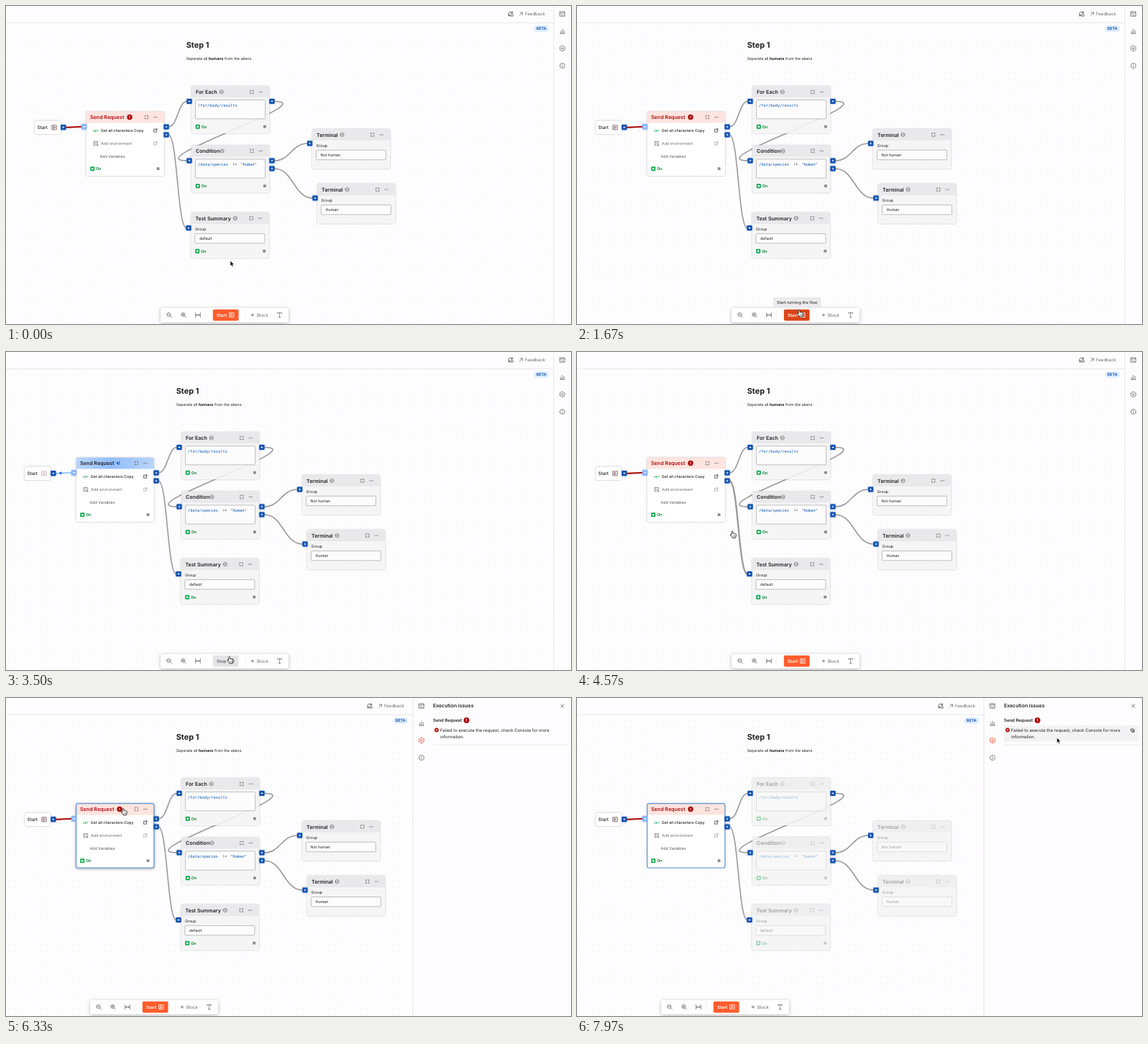
An HTML page that plays this animation: 786x442 px, repeating every 8 s.

```html
<!DOCTYPE html>
<html lang="en">
<head>
<meta charset="utf-8">
<title>Flow editor</title>
<style>
html, body { margin: 0; width: 100%; height: 100%; overflow: hidden; background: #fdfcfe; }
svg { display: block; width: 100vw; height: 100vh; }
text { font-family: Inter, sans-serif; text-rendering: geometricPrecision; white-space: pre; }
.mono { font-family: "DejaVu Sans Mono", monospace; }
.card { filter: drop-shadow(0 .8px 1.3px rgba(0,0,0,.3)); }
.port { filter: drop-shadow(0 0 1.2px rgba(20,80,180,.5)); }
.bar { filter: drop-shadow(0 1px 2.5px rgba(0,0,0,.28)); }
.ico { fill: none; stroke: #6b6b6b; stroke-width: .8; stroke-linecap: round; stroke-linejoin: round; }
</style>
</head>
<body>
<svg id="stage" viewBox="0 0 786 442" xmlns="http://www.w3.org/2000/svg"></svg>
<script>
const LOOP = 8000;
const INK = '#212121', GREY = '#6b6b6b', RED = '#ab0a0a', BLUE = '#0b4fae', GREEN = '#0cab4c', ORANGE = '#ff5c2d';

// ---- drawing helpers ----
const text = (x, y, s, size = 5.35, fill = INK, weight = 400, extra = '') =>
  `<text x="${x}" y="${y}" font-size="${size}" fill="${fill}" font-weight="${weight}" ${extra}>${s}</text>`;
const rect = (x, y, w, h, fill, r = 0, extra = '') =>
  `<rect x="${x}" y="${y}" width="${w}" height="${h}" rx="${r}" fill="${fill}" ${extra}/>`;
const icon = (x, y, d, extra = '') =>
  `<path class="ico" transform="translate(${x} ${y})" d="${d}" ${extra}/>`;
const group = (id, body, extra = '') => `<g id="${id}" ${extra}>${body}</g>`;
const ring = r => `M${-r} 0a${r} ${r} 0 1 0 ${2 * r} 0a${r} ${r} 0 1 0 ${-2 * r} 0`;
const badge = (x, y, r) =>
  `<circle cx="${x}" cy="${y}" r="${r}" fill="${RED}"/>` +
  text(x, y + r * .55, '!', r * 1.55, '#fff', 700, 'text-anchor="middle"');

const PLAY = 'M-3 -3h6v6h-6zM-1 -1.5L1.5 0L-1 1.5z';
const EXPAND = 'M-2.2 -.8v-1.4h1.4M.8 -2.2h1.4v1.4M2.2 .8v1.4h-1.4M-.8 2.2h-1.4v-1.4';
const OPEN = 'M0 -2h-2v4h4v-2M.3 -.3L2.3 -2.3M.8 -2.4h1.6v1.6';
const INFO = ring(3.5) + 'M0 -.4v2M0 -1.8v.1';

// ---- canvas nodes ----
const header = (x, y, w, fill) =>
  `<path d="M${x} ${y + 15.7}v-13.2q0 -2.5 2.5 -2.5h${w - 5}q2.5 0 2.5 2.5v13.2z" fill="${fill}"/>`;

const tools = (right, cy) => icon(right - 24.5, cy, EXPAND) +
  [-2, 0, 2].map(d => `<circle cx="${right - 12 + d}" cy="${cy}" r=".65" fill="${GREY}"/>`).join('');

const status = (x, y, right) =>
  rect(x, y - 3, 6, 6, GREEN, 1) + rect(x + 1.7, y - 1.3, 2.6, 2.6, '#fff', .6) +
  text(x + 8, y + 2, 'On', 5.4, '#007f31', 600) +
  rect(right - 10, y - 1.9, 3.8, 3.8, '#8a8a8a', .5);

const field = (x, y, h) => rect(x, y, 97, h, '#fff', 1, 'fill-opacity=".75" stroke="#a6a6a6" stroke-width=".7"');
const groupField = (x, y, value) =>
  text(x + 5.6, y + 25, 'Group') + field(x + 5.5, y + 29.2, 13.4) + text(x + 11.5, y + 37.8, value);

function node(x, y, h, title, iconX, body) {
  const w = 108.3, cy = y + 7.8;
  return rect(x, y, w, h, '#fff', 2.5, 'class="card" fill-opacity=".84"') +
    `<g class="dim">` + header(x, y, w, '#e9e8eb') + text(x + 6, cy + 2.6, title, 7.1, INK, 600) +
    icon(iconX, cy, ring(2.6) + 'M-1.2 0h2.4', 'stroke-width=".6"') + tools(x + w, cy) + body + '</g>';
}

const code = (x, y, s, fill = '#0a56b0') => text(x, y, s, 5.38, fill, 400, 'class="mono"');

const nodes =
  node(244.1, 111.6, 65.5, 'For Each', 285.8, field(249.6, 130.6, 26.2) +
    code(253, 140, '/for/body/results') + status(249.8, 167.7, 354)) +
  node(244.1, 193.7, 65.8, 'Condition', 286.5, field(249.6, 212.9, 26.2) +
    code(253, 222, '/data/species') + code(300.7, 222, '!=', '#444') + code(312.3, 222, '"Human"') +
    status(249.8, 250.2, 354)) +
  node(243.4, 287.2, 62.8, 'Test Summary', 304.9, groupField(243.4, 287.2, 'default') + status(249.2, 340.7, 353.3)) +
  node(412, 171.1, 55.2, 'Terminal', 453.5, groupField(412, 171.1, 'Not human')) +
  node(419, 247.3, 55.2, 'Terminal', 460.6, groupField(419, 247.3, 'Human'));

const request =
  rect(97.6, 146.7, 108.3, 89.3, '#fff', 2.5, 'id="reqCard" class="card"') +
  group('headError', header(97.6, 146.7, 108.3, '#ffe4df') +
    text(103, 157.2, 'Send Request', 7.1, RED, 600) + badge(158, 154.5, 3.7)) +
  group('headBusy', header(97.6, 146.7, 108.3, 'url(#busy)') +
    text(103, 157.2, 'Send Request', 7.1, INK, 600) +
    `<path d="M153.3 154.5l3 -2.6v5.2zM157 151.9h.9v5.2h-.9z" fill="#1763d6"/>`) +
  tools(205.9, 154.5) +
  text(107, 174.5, 'GET', 3.9, GREEN, 600) + text(117.8, 175, 'Get all characters Copy', 5.35, INK, 500) +
  icon(193.6, 173.2, OPEN, 'style="stroke:#444"') +
  icon(111, 191.2, 'M-2.6 -2.6h5.2v2M-2.6 -2.6v5.2h2M-1 0h2M2 .8v2.4M.8 2h2.4') +
  text(118, 193.2, 'Add environment', 5.35, GREY) + icon(193.6, 191.2, OPEN, 'style="stroke:#aaa"') +
  text(116.5, 210.6, 'Add Variables', 5.35, '#555') + status(103.2, 226.2, 205.7) +
  rect(97.6, 146.7, 108.3, 89.3, 'none', 2.5, 'id="reqRing" stroke="#5e97d8" stroke-width="1.2"');

const startNode = rect(26, 159.6, 36, 18.4, '#fff', 2.5, 'class="card"') +
  text(29.4, 171.2, 'Start', 6.3, INK, 500) +
  icon(53.2, 168.8, PLAY, 'id="startIcon"');

// ---- edges and ports ----
const curve = (x1, y1, x2, y2, d = (x2 - x1) / 2) =>
  `M${x1} ${y1}C${x1 + d} ${y1} ${x2 - d} ${y2} ${x2} ${y2}`;
const edge = (d, extra = '') => `<path d="${d}" fill="none" stroke="#9b999c" stroke-width="1.6" ${extra}/>`;
const edges = edge(curve(212, 168, 238, 132.5)) +
  edge(curve(212, 179, 237, 308.5), 'id="longEdge"') +
  edge(curve(359, 132.5, 238, 215, 70)) +
  edge(curve(359, 215, 406, 191)) + edge(curve(359, 226, 413, 267)) +
  edge(curve(69, 168.7, 92, 167.7), 'id="firstEdge"') +
  '<circle id="pulse" r="1.7" fill="#2a6fdc"/>';

const port = ([x, y]) => rect(x - 3.6, y - 3.6, 7.2, 7.2, BLUE, .8, 'class="port"') +
  `<path d="M${x - 1.5} ${y}h3M${x} ${y - 1.5}v3" stroke="#fff" stroke-width=".8"/>`;
const ports = [[65.8, 168.7], [209, 168], [209, 179], [241, 132.5], [356, 132.5], [241, 215],
  [356, 215], [356, 226], [240, 308.5], [408.6, 191], [416, 267]].map(port).join('') +
  rect(90.9, 164.2, 7.2, 7.2, '#86b6f8', .8, 'class="port"') +
  '<path d="M92.6 167.8h3.4M94.7 166.4l1.4 1.4l-1.4 1.4" fill="none" stroke="#fff" stroke-width=".8"/>';

const heading = text(236.7, 58.4, 'Step 1', 10.9, INK, 700) +
  text(236.7, 75, 'Seperate all <tspan font-weight="700">humans</tspan> from the aliens.', 5.3);

// ---- fixed interface ----
const feedback = icon(702, 11, 'M-3 .8a3 3 0 0 1 5.4 -2.4M2.6 -3.2v1.8h-1.8M-2.8 1.4a3 3 0 0 0 2.4 1.6M-3 3v-1.6h1.6', 'style="stroke:#444"') +
  `<circle cx="703.8" cy="12.8" r="1.6" fill="none" stroke="#444" stroke-width=".8"/>` +
  icon(716.6, 11, 'M-2 2L1.8 -1.8M-1.2 -2h3.2v3.2') +
  text(722, 13.1, 'Feedback', 6.05, GREY);
const beta = rect(734.5, 27, 20.5, 8.8, '#dcebfd', 4.4) +
  text(744.8, 33.4, 'BETA', 5.3, BLUE, 600, 'text-anchor="middle"');

const sidebar = rect(762, -1, 240, 444, '#fdfcfe', 0, 'stroke="#e3e2e5" stroke-width=".8"') +
  icon(774, 11, 'M-3.3 -3.2h6.6v6.4h-6.6zM-3.3 -1.4h6.6M-1.6 .2l1 .8l-1 .8M.4 1.9h1.4') +
  icon(774, 35, 'M-3.2 3.2h6.4M-2.4 2.8v-2.4M-.2 2.8v-5.4M2.2 2.8v-4', 'stroke-width="1.2"') +
  icon(774, 59, 'M0 -3.8L3.3 -1.9V1.9L0 3.8L-3.3 1.9V-1.9z' + ring(1.1), 'id="issueIcon"') +
  icon(774, 83, INFO);

const panel = text(594, 13.3, 'Execution issues', 6.95, INK, 600) +
  icon(774, 11, 'M-2.2 -2.2L2.2 2.2M2.2 -2.2L-2.2 2.2') +
  text(594, 33, 'Send Request', 6, INK, 600) + badge(640.6, 31, 3.9) +
  group('rowHover', rect(594, 38.2, 188, 22.5, '#f3f2f4', 1) +
    icon(773, 45.2, 'M-2 -2.2h3v3h-3zM-.8 1v1.2h3v-3h-1', 'style="stroke:#333"')) +
  `<circle cx="599" cy="44.5" r="2.9" fill="${RED}"/>` +
  icon(599, 44.5, 'M-1 -1L1 1M1 -1L-1 1', 'style="stroke:#fff"') +
  text(604, 46.5, 'Failed to execute the request, check Console for more', 5.95) +
  text(604, 56, 'information.', 5.95) +
  rect(594, 64.6, 188, .8, '#e3e2e5');

const lens = 'M1.4 1.4L3.4 3.4M-3.2 -.6a2.6 2.6 0 1 0 5.2 0a2.6 2.6 0 1 0 -5.2 0M-1.8 -.6h2.4';
const toolbar = rect(215, 419.8, 178, 20, '#fff', 2.5, 'class="bar"') +
  icon(227, 429.5, lens) + icon(247, 429.5, lens + 'M-.6 -1.8v2.4') +
  icon(267, 429.5, 'M-3.4 -3v6M3.4 -3v6M-2.6 0h5.2M-1.4 -1.2l-1.2 1.2l1.2 1.2M1.4 -1.2l1.2 1.2l-1.2 1.2') +
  rect(277.4, 423.5, .6, 12, '#ececee') + rect(333.2, 423.5, .6, 12, '#ececee') +
  rect(287.8, 421.8, 35.8, 15.6, ORANGE, 1.8, 'id="runButton"') +
  group('runLabel', text(293, 431.7, 'Start', 6.05, '#fff', 600) + icon(314, 429.5, PLAY, 'style="stroke:#fff"')) +
  group('stopLabel', text(293, 431.7, 'Stop', 6.05, '#555', 500) +
    icon(314, 429.5, ring(3.2) + 'M-1 -1h2v2h-2z')) +
  icon(343, 429.5, 'M-1.8 0h3.6M0 -1.8v3.6') + text(349, 431.7, 'Block', 6.1, GREY) +
  icon(380.7, 429.5, 'M-3 -2v-1.2h6v1.2M0 -3.2v6.4M-1.2 3.2h2.4');

const tip = rect(273.3, 405.2, 65.8, 13.8, '#ebeaed', 1.5, 'stroke="#dddce0" stroke-width=".5"') +
  text(306.2, 414, 'Start running the flow', 5.55, INK, 400, 'text-anchor="middle"');
const hint = rect(635.7, 422, 122.6, 17.6, '#efeef1', 2) +
  icon(645.5, 430.8, INFO, 'style="stroke:#444"') +
  text(653.6, 433, 'Send a request from any collection', 6, '#444');

const arrow = '<path d="M0 0V7.6L1.8 6L3 8.7L4.3 8.1L3.1 5.5H5.5Z" fill="#111" stroke="#fff" stroke-width=".6"/>';
const hand = '<path d="M-.9 .9Q-.8 0 0 0T1 .9V3.2Q2 2.6 2.6 3.4Q3.6 2.9 4 3.7Q5.2 3.4 5.3 4.6V6.4Q5.2 7.8 4.4 8.4V9.4H.2V8.6L-2.6 5.6Q-2.9 4.5 -1.8 4.6L-.9 5.3Z" fill="#fff" stroke="#111" stroke-width=".8" stroke-linejoin="round"/><path d="M1.2 6v1.8M2.5 6v1.8M3.8 6v1.8" stroke="#111" stroke-width=".5"/>';

document.getElementById('stage').innerHTML = `<defs>
  <pattern id="dots" width="8.9" height="8.9" patternUnits="userSpaceOnUse"><circle cx="4.4" cy="4.4" r=".42" fill="#d3d1d7"/></pattern>
  <linearGradient id="busy" gradientUnits="userSpaceOnUse" x1="0" x2="108" spreadMethod="repeat">
    <stop offset="0" stop-color="#b9d5fc"/><stop offset=".45" stop-color="#93bdfa"/><stop offset="1" stop-color="#b9d5fc"/>
  </linearGradient></defs>` +
  rect(0, 0, 786, 442, '#fdfcfe') +
  group('world', rect(-20, 23, 830, 420, 'url(#dots)') + heading + edges + nodes + startNode + request + ports) +
  rect(0, 0, 786, 23, '#fdfcfe') + rect(0, 22.8, 786, .8, '#e3e2e5') +
  group('top', feedback + beta) + group('side', sidebar) + group('panel', panel) +
  group('toolbar', toolbar) + group('tip', tip) + group('hint', hint) +
  group('arrow', arrow) + group('hand', hand);

// ---- motion ----
const el = {};
document.querySelectorAll('[id]').forEach(e => el[e.id] = e);
const dimmed = document.querySelectorAll('.dim');

const clamp = v => Math.max(0, Math.min(1, v));
const ease = (t, a, b) => { const k = clamp((t - a) / (b - a)); return k * k * (3 - 2 * k); };
const within = (t, a, b) => t >= a && t < b;
const show = (e, on) => e.setAttribute('display', on ? 'inline' : 'none');
const move = (e, x, y) => e.setAttribute('transform', `translate(${x} ${y})`);

// time, x, y of the pointer tip
const TRACK = [[900, 312, 354], [1400, 309, 422.5], [2000, 309, 422.5], [2500, 310.5, 423.5],
  [4130, 310.5, 423.5], [4560, 216, 249], [4650, 216, 249], [5150, 160, 154], [6300, 160, 154],
  [6900, 540, 87], [7050, 540, 87], [7450, 667.5, 55]];

function pointer(t) {
  let [, x, y] = TRACK[0];
  for (let i = 1; i < TRACK.length; i++) {
    const [a, px, py] = TRACK[i - 1], [b, qx, qy] = TRACK[i];
    const k = ease(t, a, b);
    if (t >= a) { x = px + (qx - px) * k; y = py + (qy - py) * k; }
  }
  return [x, y];
}

function render(t) {
  const busy = within(t, 2650, 3950);
  const open = t >= 6050;
  const onButton = within(t, 1300, 4200);
  const onNode = within(t, 4850, 6400);
  const onRow = t >= 7330;

  move(el.world, 14 * (1 - ease(t, 120, 800)), 0);

  show(el.headError, !busy);
  show(el.headBusy, busy);
  show(el.pulse, busy);
  const k = (t - 3200) / 1000 % 1;
  move(el.pulse, 69 + 23 * (k < 0 ? k + 1 : k), 168.3);
  document.getElementById('busy').setAttribute('gradientTransform', `translate(${97.6 + (t - 3500) * .108} 0)`);
  el.firstEdge.style.stroke = busy ? '#8ab8f8' : RED;
  el.firstEdge.style.strokeWidth = busy ? 1.6 : 2;
  el.startIcon.style.stroke = busy ? '#c9a9b8' : '#6d4a4a';
  el.longEdge.style.strokeWidth = within(t, 4480, 4760) ? 2.3 : 1.6;

  el.reqCard.style.filter = onNode ? 'drop-shadow(0 1px 2px rgba(0,0,0,.45))' : '';
  show(el.reqRing, open);
  dimmed.forEach(d => d.style.opacity = 1 - .6 * ease(t, 7330, 7480));

  el.runButton.setAttribute('fill', busy ? '#e4e3e6' : onButton ? '#d8461b' : ORANGE);
  show(el.runLabel, !busy);
  show(el.stopLabel, busy);
  show(el.tip, within(t, 1450, 2650));
  show(el.hint, onNode && !open);

  move(el.top, open ? -196 : 0, 0);
  move(el.side, open ? -196 : 0, 0);
  move(el.toolbar, open ? -98 : 0, 0);
  show(el.panel, open);
  show(el.rowHover, onRow);
  el.issueIcon.style.stroke = open ? '#e5482a' : '';

  const [x, y] = pointer(t), hover = within(t, 1300, 6400);
  show(el.hand, hover);
  show(el.arrow, !hover);
  move(el.hand, x, y);
  move(el.arrow, x, y);
}

const begin = performance.now();
function tick() {
  render((performance.now() - begin) % LOOP);
  requestAnimationFrame(tick);
}
tick();
</script>
</body>
</html>
```
